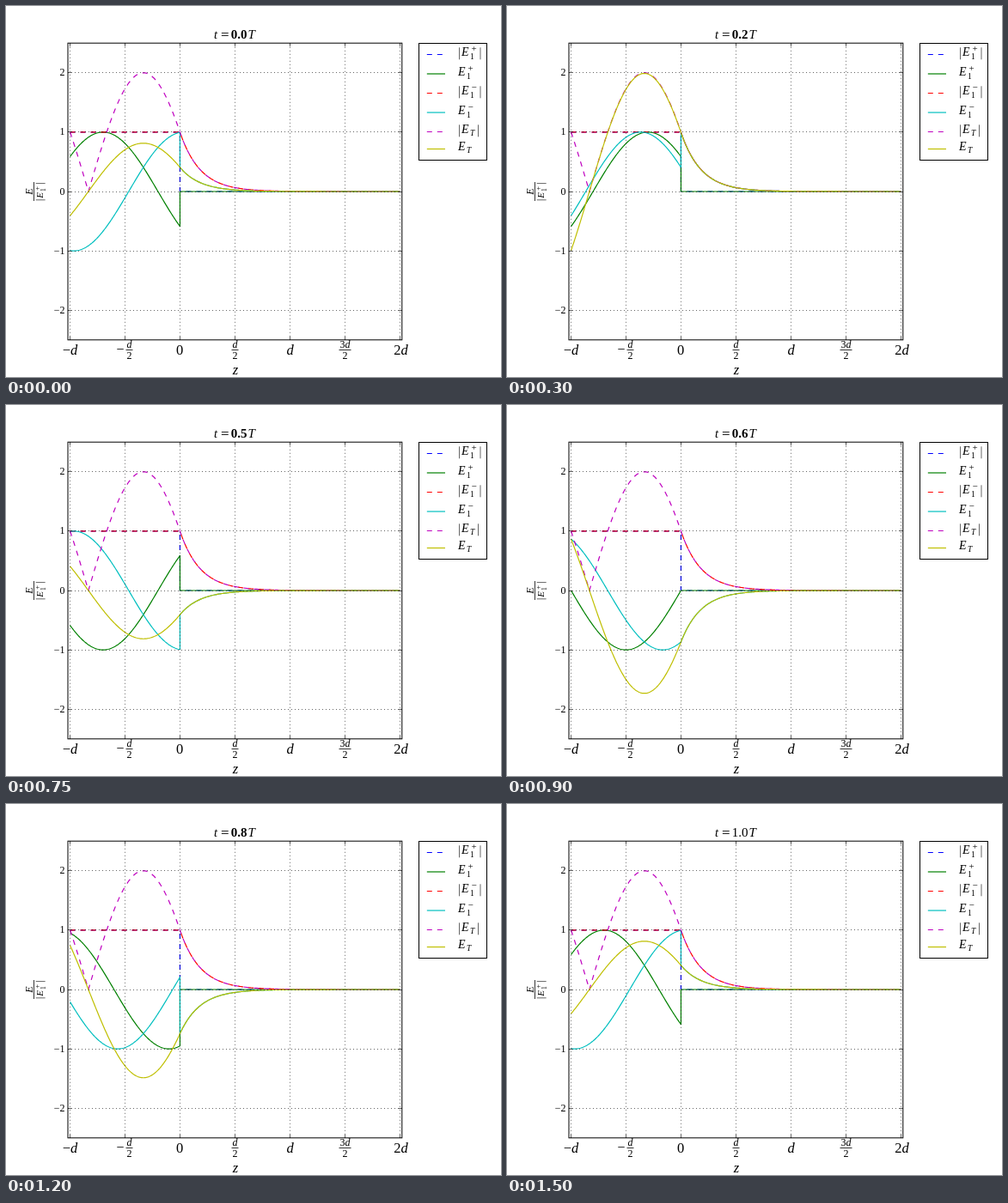
Write an HTML page that moves like this. It is 576 px wide and 432 px high and loops after 1650 ms.

```html
<!DOCTYPE html>
<html lang="en">
<head>
<meta charset="utf-8">
<style>
html, body { margin: 0; width: 100%; height: 100%; overflow: hidden; background: #fff; }
svg { display: block; font-family: "Liberation Serif", "Times New Roman", serif; }
.it { font-style: italic; }
.mid { text-anchor: middle; }
.end { text-anchor: end; }
.curve { fill: none; stroke-width: 1.2; stroke-linejoin: round; }
.grid { stroke: #000; stroke-width: .6; stroke-dasharray: 1 3; }
.tick { stroke: #000; stroke-width: .6; }
.bar { stroke: #000; stroke-width: .8; }
.frame { fill: none; stroke: #000; }
</style>
</head>
<body>
<svg id="stage" width="576" height="432" viewBox="0 0 576 432"></svg>
<script>
const LEFT = 72, RIGHT = 460.8, TOP = 43.2, BOTTOM = 388.8;
const STEP = 150, STEPS = 11, PI = Math.PI;
const px = z => LEFT + (z + 1.02) * (RIGHT - LEFT) / 3.04;
const py = v => 216 - v * 69.12;
const snap = v => Math.floor(v) + .5;

const text = (x, y, size, str, cls = '', extra = '') =>
  `<text x="${x}" y="${y}" font-size="${size}" class="${cls}" ${extra}>${str}</text>`;
const line = (x1, y1, x2, y2, cls, extra = '') =>
  `<line x1="${x1}" y1="${y1}" x2="${x2}" y2="${y2}" class="${cls}" ${extra}/>`;

// Field symbol with optional superscript and magnitude bars
function symbol(x, y, size, sub, sup, bars) {
  const s = size / 14, small = size * .68;
  const x0 = x + (bars ? 4 * s : 0);
  let out = text(x0, y, size, 'E', 'it') +
    text(x0 + 10 * s, y + (sup ? 4 : 2.5) * s, small, sub, sub === 'T' ? 'it' : '');
  if (sup) out += text(x0 + 11.5 * s, y - 5 * s, small * 1.15, sup);
  if (bars) {
    for (const bx of [x + 1.5 * s, x + (sup ? 26 : 23.5) * s])
      out += line(bx, y - 10 * s, bx, y + 4 * s, 'tick');
  }
  return out;
}

const series = [
  { color: '#00f', dash: '6 6', sub: '1', sup: '+', bars: true, y: 56.5 },
  { color: '#008000', sub: '1', sup: '+', y: 79 },
  { color: '#f00', dash: '6 6', sub: '1', sup: '−', bars: true, y: 101.5 },
  { color: '#00bfbf', sub: '1', sup: '−', y: 124 },
  { color: '#bf00bf', dash: '6 6', sub: 'T', bars: true, y: 146.5 },
  { color: '#bfbf00', sub: 'T', y: 166.5 }
];
const pen = s => `class="curve" stroke="${s.color}" stroke-dasharray="${s.dash || 'none'}"`;

function axes() {
  let out = '';
  for (let i = -2; i <= 4; i++) {
    const x = snap(px(i / 2));
    out += line(x, BOTTOM, x, TOP, 'grid') +
      line(x, BOTTOM, x, BOTTOM - 4, 'tick') + line(x, TOP, x, TOP + 4, 'tick');
  }
  for (let v = -2; v <= 2; v++) {
    const y = snap(py(v));
    out += line(LEFT, y, RIGHT, y, 'grid') +
      line(LEFT, y, LEFT + 4, y, 'tick') + line(RIGHT, y, RIGHT - 4, y, 'tick') +
      text(68.5, y + 3.5, 12, String(v).replace('-', '−'), 'end');
  }
  return out;
}

const fraction = (x, top, half) =>
  text(x, 398, 12, top, 'mid') + text(x, 410.5, 12, '2', 'mid') +
  line(x - half, 400.5, x + half, 400.5, 'bar');

function labels() {
  const d = '<tspan class="it">d</tspan>';
  return text(74.5, 406, 16.5, '−' + d, 'mid') +
    text(133, 405, 16, '−', 'mid') + fraction(143.5, d, 4) +
    text(202, 406, 16.5, '0', 'mid') + fraction(266.5, d, 4) +
    text(330.5, 406, 16.5, d, 'mid') + fraction(394.5, '3' + d, 7) +
    text(459.5, 406, 16.5, '2' + d, 'mid') + text(267, 429, 16.5, 'z', 'it mid') +
    '<g transform="translate(32.5 216) rotate(-90)">' +
    text(0, -2, 12, 'E', 'it mid') + line(-11, 0, 11, 0, 'bar') +
    symbol(-11, 10, 11, '1', '+', true) + '</g>';
}

const legend = () =>
  '<rect x="480.5" y="43.5" width="79" height="136" class="frame"/>' +
  series.map(s => `<path ${pen(s)} d="M489.8 ${s.y}H511"/>` +
    symbol(526, s.y + 1.8, 14, s.sub, s.sup, s.bars)).join('');

const title = () =>
  text(242, 38, 14.4, 't', 'it') + text(250, 38.5, 17, '=') +
  text(271, 38, 15, '', 'mid', 'id="time"') + text(281.5, 38, 15, 'T', 'it');

const stage = document.getElementById('stage');
stage.innerHTML =
  `<g id="curves">${series.map(s => `<path ${pen(s)}/>`).join('')}</g>` + axes() +
  `<rect x="${LEFT}" y="${TOP}" width="${RIGHT - LEFT}" height="${BOTTOM - TOP}" class="frame"/>` +
  labels() + legend() + title();

const paths = document.getElementById('curves').children;
const time = document.getElementById('time');

function trace(f, from, to, start) {
  const n = (to - from) * 120;
  let d = start;
  for (let i = 0; i <= n; i++) {
    const z = from + (to - from) * i / n;
    d += `${i ? 'L' : ''}${px(z).toFixed(2)} ${py(f(z)).toFixed(2)}`;
  }
  return d;
}
const whole = (inside, beyond) => trace(inside, -1, 0, 'M') + trace(beyond, 0, 2, 'L');

function draw(step) {
  const w = 2 * PI * step / 10;
  const zero = () => 0, one = () => 1;
  const decay = z => Math.exp(-Math.sqrt(3) * PI * z);
  const sent = z => Math.cos(w - PI * z - .7 * PI);
  const back = z => Math.cos(w + PI * z - PI / 30);
  const through = z => Math.cos(w - 11 * PI / 30) * decay(z);
  const shapes = [
    whole(one, zero),
    whole(sent, zero),
    whole(one, decay),
    whole(back, through),
    whole(z => 2 * Math.abs(Math.cos(PI * z + PI / 3)), decay),
    whole(z => sent(z) + back(z), through)
  ];
  shapes.forEach((d, i) => paths[i].setAttribute('d', d));
  time.textContent = (step / 10).toFixed(1);
  time.setAttribute('font-weight', step < 10 ? 'bold' : 'normal');
}

let shown = 0, begin;
function tick(now) {
  begin ??= now;
  const step = Math.floor((now - begin) / STEP) % STEPS;
  if (step !== shown) draw(shown = step);
  requestAnimationFrame(tick);
}
draw(0);
requestAnimationFrame(tick);
</script>
</body>
</html>
```
